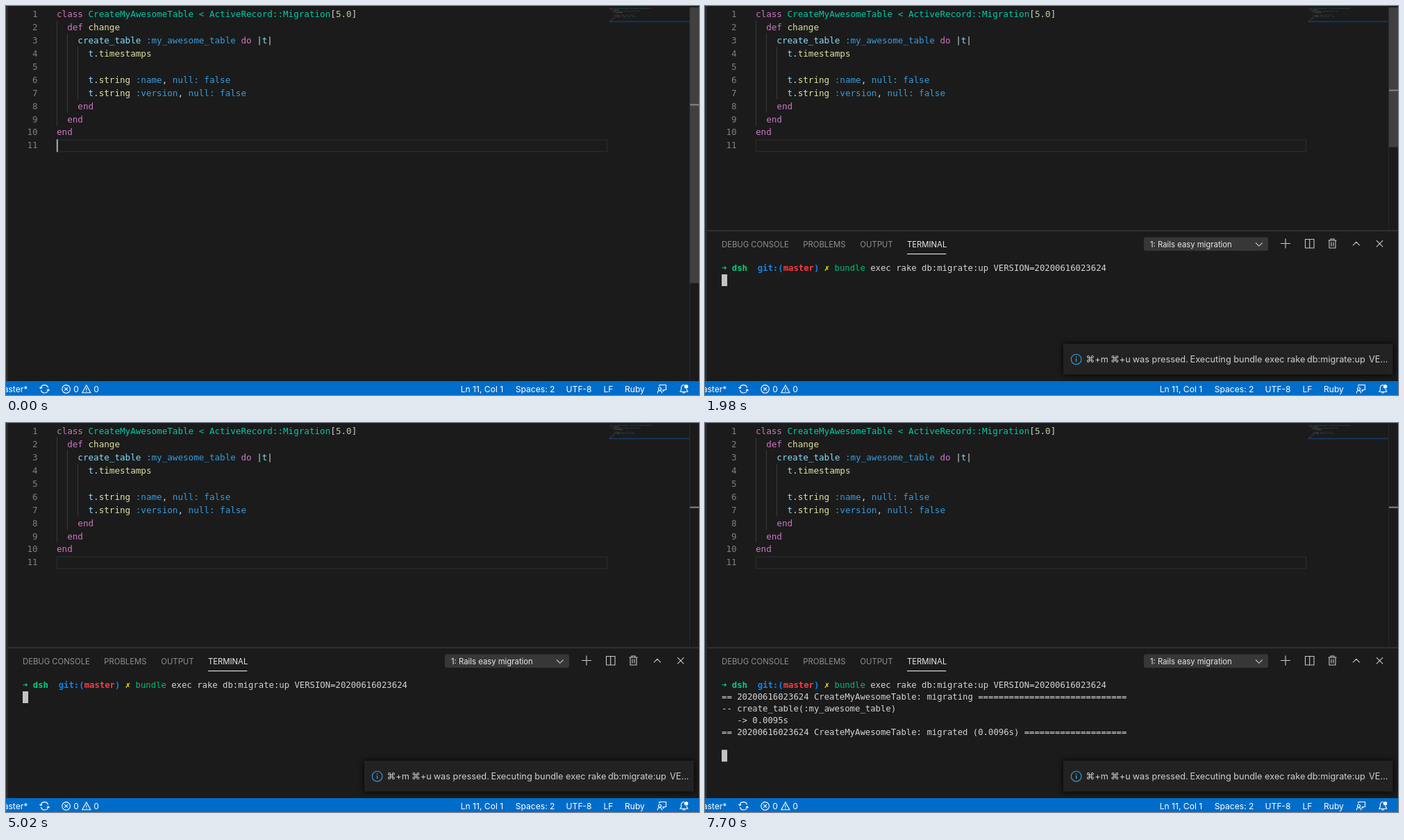
Write an HTML page that moves like this. It is 998x561 px and loops after 8 s.

```html
<!DOCTYPE html>
<html lang="en">
<head>
<meta charset="utf-8">
<title>Migration run</title>
<style>
html, body { margin: 0; width: 100%; height: 100%; overflow: hidden; background: #1b1b1b; }
svg { display: block; width: 100vw; height: 100vh; }
text { white-space: pre; fill: #d4d4d4; }
.mono { font-family: "DejaVu Sans Mono", monospace; font-size: 12.6px; }
.term { font-family: "DejaVu Sans Mono", monospace; font-size: 12.27px; }
.term text { fill: #cfcfcf; }
.ui { font-family: Inter, "DejaVu Sans", sans-serif; }
.status text { font-size: 12.1px; fill: #fff; }
.tabs text { font-size: 11.3px; fill: #8f8f8f; }
.tabs .on { fill: #e9e9e9; }
.note text { font-size: 12.75px; fill: #cfcfcf; }
.line { fill: none; stroke-width: 1.1; }
.num { fill: #7f7f7f; text-anchor: end; }
.k { fill: #d075c6; } .c { fill: #00caa9; } .f { fill: #dfe0a3; }
.v { fill: #84dcff; } .s { fill: #379bdb; } .n { fill: #b4d0a2; } .w { fill: #d4d4d4; }
.g { fill: #00d080; font-weight: bold; } .b { fill: #1384e8; font-weight: bold; }
.r { fill: #ff3a43; font-weight: bold; } .y { fill: #f4f400; font-weight: bold; }
.e { fill: #00be74; }
</style>
</head>
<body>
<svg id="stage" viewBox="0 0 998 561" preserveAspectRatio="none"></svg>
<script>
const LOOP = 8000, OPEN = 1980;

// Each ~x switches to the colour class x.
const code = [
  '~kclass ~cCreateMyAwesomeTable < ActiveRecord::Migration~w[~n5.0~w]',
  '~w  ~kdef ~fchange',
  '~w    ~vcreate_table ~s:my_awesome_table ~kdo ~w|~vt~w|',
  '~w      ~vt~w.~ftimestamps',
  '',
  '~w      ~vt~w.~fstring ~s:name~w, ~snull: false',
  '~w      ~vt~w.~fstring ~s:version~w, ~snull: false',
  '~w    ~kend',
  '~w  ~kend',
  '~kend',
  ''
];
const version = '20200616023624';
const header = `== ${version} CreateMyAwesomeTable: `;
const output = [
  [OPEN, '~g➜ dsh  ~bgit:(~rmaster~b) ~y✗ ~ebundle~w exec rake db:migrate:up VERSION=' + version],
  [6600, '~w' + header + 'migrating ' + '='.repeat(29)],
  [6600, '~w-- create_table(:my_awesome_table)'],
  [7260, '~w   -> 0.0095s'],
  [7260, '~w' + header + 'migrated (0.0096s) ' + '='.repeat(20)]
];

const escape = s => s.replace(/&/g, '&amp;').replace(/</g, '&lt;').replace(/>/g, '&gt;');
const spans = s => s.replace(/~(\w)([^~]*)/g, (_, cls, part) => `<tspan class="${cls}">${escape(part)}</tspan>`);
const text = (x, y, s, attrs = '') => `<text x="${x}" y="${y}" ${attrs}>${s}</text>`;
const rect = (x, y, w, h, fill, attrs = '') =>
  `<rect x="${x}" y="${y}" width="${w}" height="${h}" fill="${fill}" ${attrs}/>`;
const line = (d, stroke, attrs = '') => `<path class="line" d="${d}" stroke="${stroke}" ${attrs}/>`;
const during = (from, to, body) => `<g data-from="${from}" data-to="${to}">${body}</g>`;
const rows = (x, y, pitch) => code.map((s, i) => text(x, y + i * pitch, spans(s))).join('');

function editor() {
  const pitch = 18.93;
  const guides = [[73.5, 1, 9], [88.5, 2, 8], [103.5, 3, 7]]
    .map(([x, a, b]) => line(`M${x} ${2.2 + a * pitch}V${2.2 + b * pitch}`, '#393939')).join('');
  const numbers = code.map((_, i) => text(45.7, 16.1 + i * pitch, i + 1, 'class="num"')).join('');
  const minimap = rect(869, 21.5, 115, 2, '#12375a') +
    `<g transform="translate(869 3.6) scale(.1385)" opacity=".75">${rows(0, 0, 14.4)}</g>`;
  return rect(0, 0, 3, 541, '#2b2b2b') + guides +
    `<rect x="73.5" y="193" width="792" height="17" fill="none" stroke="#292929" stroke-width="1.6"/>` +
    `<g class="mono">${numbers}${rows(73, 16.1, pitch)}${minimap}</g>` +
    during(0, OPEN, rect(72.8, 192.3, 2, 18.2, '#aeaeae'));
}

function scrollbar(from, fadeAt, to, bottom, slider, mark) {
  return during(from, to, line(`M984.5 2V${bottom}`, '#292929') +
    during(from, fadeAt, rect(985, 2, 13, slider - 2, '#404040')) +
    rect(985, mark, 13, 2, '#878787'));
}

function panel() {
  const tabs = [[24, 'DEBUG CONSOLE'], [141.3, 'PROBLEMS'], [223.3, 'OUTPUT']]
    .map(([x, s]) => text(x, 348, s)).join('');
  const icons = [
    'M793 341.5l4.8 4.8 4.8-4.8',
    'M829 342.5h14M836 335.5v14',
    'M864.5 336.5h12.5v12.5h-12.5zM870.7 336.5v12.5',
    'M897.5 338h12M901 338v-2h5v2M899 338v11h9v-11M902 340.5v6M905 340.5v6',
    'M933 345.3l4.9-4.9 4.9 4.9',
    'M967 338.2l9.2 9.2M976.2 338.2l-9.2 9.2'
  ].join('');
  const shell = output.map(([at, s], i) =>
    during(at, LOOP, text(24, 382.2 + i * 16.87, spans(s)))).join('');
  const carets = [[OPEN, 6600, 0], [6600, 7260, 2], [7260, LOOP, 5]]
    .map(([a, b, row]) => during(a, b, rect(24, 387 + row * 16.87, 8, 17, '#c3c3c3'))).join('');
  return during(OPEN, LOOP,
    rect(3, 323.5, 995, 1.1, '#414141') +
    rect(632, 333.5, 179, 19.5, '#373737', 'rx="3"') +
    `<g class="ui tabs">${tabs}${text(291, 348, 'TERMINAL', 'class="on"')}` +
    `${text(641, 348, '1: Rails easy migration', 'class="on"')}</g>` +
    rect(291, 357, 56.3, 1.1, '#e7e7e7') + line(icons, '#c8c8c8') +
    `<g class="term">${shell}${carets}</g>` + notice());
}

function notice() {
  const words = [[548.5, '⌘+m'], [584, '⌘+u'], [615.7, 'was pressed.'], [698.5, 'Executing bundle exec rake'],
    [867, 'db:migrate:up'], [956, 'VE...']].map(([x, s]) => text(x, 514.4, s)).join('');
  return rect(516, 487, 474.5, 44.5, '#222', 'style="filter:drop-shadow(0 0 4px #000)"') +
    `<g class="ui note">${words}</g>` +
    '<circle class="line" cx="534.6" cy="509.6" r="7.3" stroke="#379bdb"/>' +
    line('M534.6 508.3v5M534.6 505.5v1.5', '#379bdb', 'style="stroke-width:1.4"');
}

function statusBar() {
  const labels = [[97.3, '0'], [126.3, '0'], [654.7, 'Ln 11, Col 1'], [733.8, 'Spaces: 2'],
    [806.6, 'UTF-8'], [860.5, 'LF'], [891, 'Ruby']].map(([x, s]) => text(x, 556.7, s)).join('');
  const icons = [
    'M50 551.5a5.4 5.4 0 0 1 10.6-.8M48.3 549.8l1.8 2 2-1.8',
    'M61 553.2a5.4 5.4 0 0 1-10.6.8M62.6 554.8l-1.8-2-2 1.8',
    'M84.3 550.1l4.6 4.6M88.9 550.1l-4.6 4.6',
    'M115.8 546.8l6 11h-12zM115.8 550.6v3.6M115.8 555v1.3',
    'M941 549v-2.5h9.5v7h-2l-2 2v-2h-1M938.3 558.5c0-5 6.4-5 6.4 0',
    'M977 546.6c-3-.3-4.6 1.7-4.6 4.2v2.7l-1.6 2.8h11l-1.4-2.8v-1.2M974.5 556.5c.2 2.4 3.2 2.4 3.5 0'
  ].join('');
  return rect(0, 541, 998, 20, '#006dca') +
    `<g class="ui status">${text(31.3, 556.7, 'master*', 'text-anchor="end"')}${labels}</g>` +
    line(icons, '#fff') +
    '<circle class="line" cx="86.6" cy="552.4" r="5.8" stroke="#fff"/>' +
    '<circle class="line" cx="941.5" cy="552.2" r="2" stroke="#fff"/>' +
    '<circle cx="979.6" cy="548.8" r="2.8" fill="#fff"/>';
}

const stage = document.getElementById('stage');
stage.innerHTML = editor() +
  scrollbar(0, 660, OPEN, 541, 399.5, 141.4) +
  scrollbar(OPEN, 2640, LOOP, 323, 203.5, 120.6) +
  panel() + statusBar();

const timed = [...stage.querySelectorAll('[data-from]')];
const start = performance.now();
function draw() {
  const t = (performance.now() - start) % LOOP;
  for (const el of timed) {
    el.style.display = t >= +el.dataset.from && t < +el.dataset.to ? '' : 'none';
  }
  requestAnimationFrame(draw);
}
draw();
</script>
</body>
</html>
```
